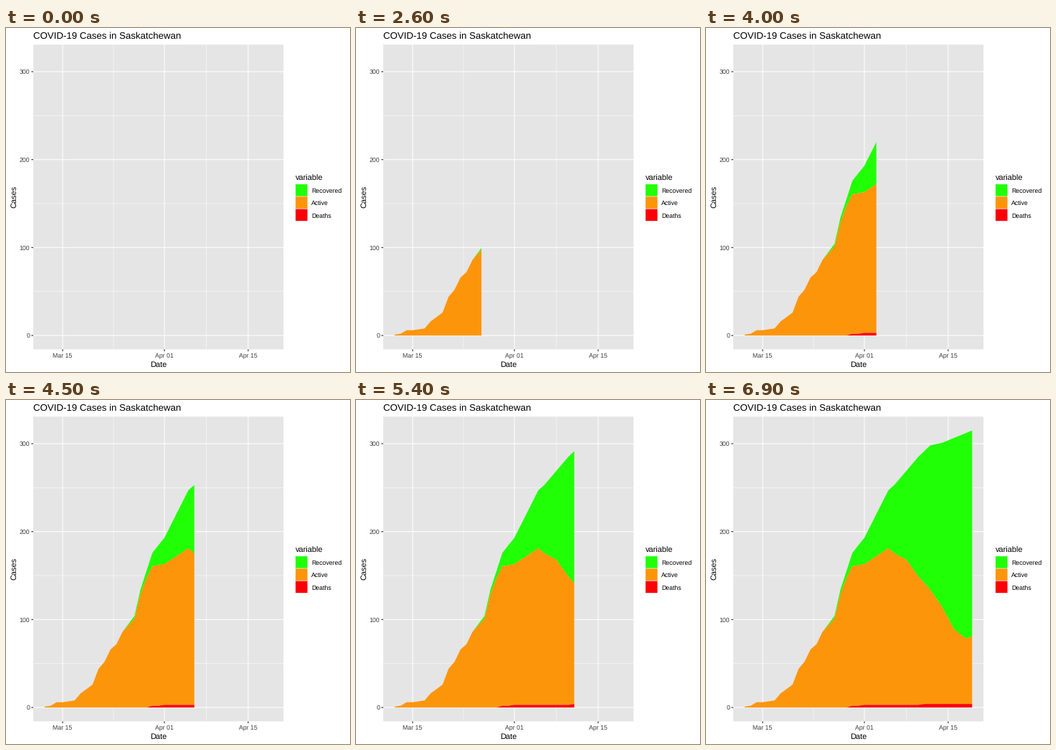
Recreate the animation shown at these times as a matplotlib script. Size 480 by 480 pixels, loop 10000 ms.

```python
import numpy as np
import matplotlib.pyplot as plt
from matplotlib.animation import FuncAnimation
from matplotlib.patches import Polygon, Rectangle

SIZE, DPI = 480, 100
PT = 72 / DPI  # points per pixel
FRAMES, INTERVAL, LAST = 100, 100, 69

LEFT, RIGHT, TOP, BOTTOM = 38.1, 387.2, 23.2, 448.4
GREEN, ORANGE, RED = "#21FF06", "#FD950A", "#FB0007"
PANEL, KEY, LABEL, TICK = "#E5E5E5", "#EFEFEF", "#3F3F3F", "#252525"

# Days count from Mar 12; curves run straight between (day, cases) bends
days = np.arange(39)


def curve(*bends):
    return np.interp(days, *zip(*bends))


total = curve((0, 1), (1, 2), (2, 6), (3, 6), (5, 8), (6, 16), (8, 26),
              (9, 44), (10, 52), (11, 66), (12, 72), (13, 86), (15, 104),
              (16, 134), (18, 176), (20, 193), (24, 247), (25, 253),
              (29, 285), (31, 298), (33, 301), (38, 315))
recovered = curve((13, 0), (15, 3), (17, 8), (20, 30), (24, 66), (27, 101),
                  (29, 136), (31, 164), (33, 187), (35, 218), (37, 234))
deaths = 2 * (days >= 18) + (days >= 20) + (days >= 30)

# Each day lands on a whole frame; frames in between are interpolated
day_frames = np.round(days * LAST / days[-1])


def px(day):
    return LEFT + (RIGHT - LEFT) * (0.05 + day / days[-1]) / 1.1


def py(value):
    return BOTTOM - (BOTTOM - TOP) * (0.05 + value / total[-1]) / 1.1


plt.rcParams.update({
    "font.family": "Liberation Sans",
    "text.hinting": "none",
    "path.snap": False,
})
fig = plt.figure(figsize=(SIZE / DPI, SIZE / DPI), dpi=DPI, facecolor="white")
ax = fig.add_axes([0, 0, 1, 1])
ax.set_xlim(0, SIZE)
ax.set_ylim(SIZE, 0)
ax.axis("off")


def box(x, y, w, h, fill):
    ax.add_patch(Rectangle((x, y), w, h, facecolor=fill, edgecolor="none",
                           zorder=1))


def line(xs, ys, width=1.07, color="white"):
    ax.plot(xs, ys, color=color, lw=width * PT, solid_capstyle="butt", zorder=2)


def text(x, y, label, size, color="black", **kw):
    ax.text(x, y, label, fontsize=size * PT, color=color, va="baseline", **kw)


box(LEFT, TOP, RIGHT - LEFT, BOTTOM - TOP, PANEL)

for value in (50, 150, 250):
    line([LEFT, RIGHT], [py(value)] * 2, 0.53)
for day in (11.5, 27):
    line([px(day)] * 2, [TOP, BOTTOM], 0.53)
for value in range(0, 301, 100):
    y = py(value)
    line([LEFT, RIGHT], [y, y])
    line([LEFT - 2.75, LEFT], [y, y], color=TICK)
    text(LEFT - 4.95, y + 3.15, str(value), 8.8, LABEL, ha="right")
for day, label in ((3, "Mar 15"), (20, "Apr 01"), (34, "Apr 15")):
    x = px(day)
    line([x, x], [TOP, BOTTOM])
    line([x, x], [BOTTOM, BOTTOM + 2.75], color=TICK)
    text(x, 460, label, 8.8, LABEL, ha="center")

text(LEFT, 15, "COVID-19 Cases in Saskatchewan", 13.2)
text((LEFT + RIGHT) / 2, 473, "Date", 11, ha="center")
text(14, (TOP + BOTTOM) / 2, "Cases", 11, ha="center",
     rotation=90, rotation_mode="anchor")

text(403.7, 212.6, "variable", 11)
side, inset = 17.28, 0.4
for i, (label, color) in enumerate((("Recovered", GREEN), ("Active", ORANGE),
                                    ("Deaths", RED))):
    x, y = 403.7, 217.7 + side * i
    box(x, y, side, side, KEY)
    box(x + inset, y + inset, side - 2 * inset, side - 2 * inset, color)
    text(426.4, y + 12.4, label, 8.8)

layers = []
for low, high, color in ((total - recovered, total, GREEN),
                         (deaths, total - recovered, ORANGE),
                         (0 * days, deaths, RED)):
    area = Polygon([[0, 0]] * 3, closed=True, facecolor=color,
                   edgecolor="none", zorder=3)
    ax.add_patch(area)
    layers.append((area, low, high))


def update(frame):
    now = np.interp(frame, day_frames, days)
    shown = np.append(days[days < now], now)
    x = px(shown)
    for area, low, high in layers:
        upper = py(np.interp(shown, days, high))
        lower = py(np.interp(shown, days, low))
        area.set_visible(frame > 0)
        area.set_xy(np.column_stack([np.append(x, x[::-1]),
                                     np.append(upper, lower[::-1])]))
    return [area for area, _, _ in layers]


anim = FuncAnimation(fig, update, frames=FRAMES, interval=INTERVAL,
                     repeat=True, repeat_delay=0, blit=False)
plt.show()
```
